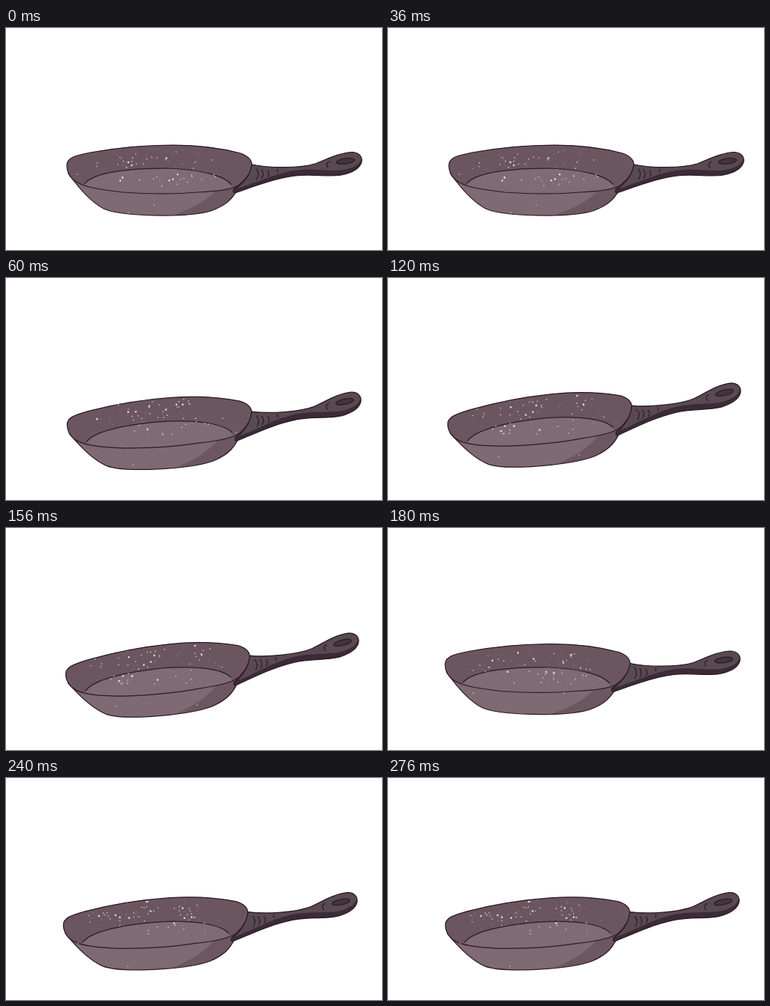
These frames come from a looping animation (500 by 296 pixels, 300 ms). An HTML page:

```html
<!DOCTYPE html>
<html lang="en">
<head>
<meta charset="utf-8">
<title>Frying pan</title>
<style>
  html, body { margin: 0; width: 100%; height: 100%; overflow: hidden; background: #fff; }
  svg { display: block; }
  .line { fill: none; stroke: #2c1b26; stroke-width: 1.25; stroke-linecap: round; stroke-linejoin: round; }
  .speck { fill: none; stroke: #eee3e7; stroke-linecap: round; }
</style>
</head>
<body>
<svg width="500" height="296" viewBox="0 0 500 296">
  <defs>
    <path id="body" d="M83 194C95 211 111 231 130 241C146 248 180 250 212 250C236 250 258 248 272 244C292 237 303 228 311 208Z"/>
    <path id="rim" d="M81 183C81 173 92 170 112 166C145 160 180 156 222 156C262 156 290 161 312 167C323 171 327 176 327 183C326 191 320 201 310 209C302 215 280 218 255 219C220 222 185 221 155 219C130 216 107 213 95 206C86 201 81 193 81 183Z"/>
    <path id="handle" d="M327 182C350 187 392 187 411 181C427 175 443 166 461 165.500C469 166 474 171 473 178C471 187 460 193 446 196C428 199 407 194 385 197C356 201 333 210 304 220Q301 219 303 215C315 207 325 196 327 182Z"/>
    <clipPath id="bodyClip"><use href="#body"/></clipPath>
  </defs>
  <g id="pan">
    <use href="#body" fill="#7f6972"/>
    <path clip-path="url(#bodyClip)" fill="#6c5660" d="M217 251C238 244 264 234 280 216L330 200V255Z"/>
    <use href="#body" class="line"/>
    <use href="#rim" fill="#6b5660"/>
    <path fill="#7f6b74" d="M104 209C118 192 165 187 212 187C255 188 293 196 301 213C285 217 270 218 255 219C220 222 185 221 155 219C130 216 112 213 104 209Z"/>
    <path class="line" d="M105 207C118 192 165 187 212 187C255 188 289 196 299 208"/>
    <use href="#rim" class="line"/>
    <use href="#handle" fill="#3a2b37"/>
    <path fill="#584953" d="M327 183C350 187 392 187 411 181C427 175 443 166 461 166C469 166 473 171 472 176C469 184 456 189 441 190C423 190 404 187 383 190C354 195 332 207 307 214C319 205 325 195 327 183Z"/>
    <use href="#handle" class="line"/>
    <ellipse class="line" style="fill:#43343f" cx="451.500" cy="177.500" rx="12" ry="3.600" transform="rotate(-8 451.500 177.500)"/>
    <path class="line" d="M333 188Q338 194 333 202M340 189Q344 195 340 200M348 190Q351 194 348 198M361 188V192M430 178Q424 181 428 186"/>
  </g>
  <path class="speck" stroke-width="1.100" stroke-opacity=".4"/>
  <path class="speck" stroke-width="1.700" stroke-opacity=".7"/>
  <path class="speck" stroke-width="2.500" stroke-opacity=".95"/>
</svg>
<script>
const STEP = 60;

// Pan pose, centres of dense speckles, and stray specks on the outside
const poses = [
  { move: "", dense: [[171, 176], [233, 199]], stray: [[163, 246], [197, 236], [95, 195]] },
  { move: "rotate(-4 270 185)", dense: [[173, 181], [238, 170]], stray: [[169, 249], [306, 206]] },
  { move: "translate(-1.500 0) rotate(-5.800 208 190)", dense: [[256, 164], [156, 202], [187, 173]], stray: [[147, 238], [254, 236]] },
  { move: "translate(-5 -1.500)", dense: [[219, 196], [236, 173]], stray: [[113, 220], [234, 220]] },
  { move: "translate(-5 .500) rotate(-4 270 185)", dense: [[139, 184], [235, 184], [191, 172]], stray: [[162, 251], [96, 220]] }
];

function randomFrom(seed) {
  return () => (seed = (seed * 16807) % 2147483647) / 2147483647;
}

const dot = (x, y) => `M${x.toFixed(1)} ${y.toFixed(1)}h.01`;

// Returns faint, medium and bright speckles as three path strings
function speckle({ dense, stray }, index) {
  const random = randomFrom(7919 * (index + 3));
  const layers = ["", "", ""];
  const scatter = (count, cx, cy, rx, ry, layer) => {
    for (let i = 0; i < count; i++) {
      const angle = random() * 2 * Math.PI;
      const reach = Math.sqrt(random());
      layers[layer] += dot(cx + rx * reach * Math.cos(angle), cy + ry * reach * Math.sin(angle));
    }
  };
  scatter(44, 202, 187, 95, 26, 0);
  scatter(24, 200, 186, 92, 25, 1);
  scatter(4, 200, 186, 86, 22, 2);
  for (const [x, y] of dense) {
    scatter(5, x, y, 19, 10, 1);
    scatter(2, x, y, 13, 8, 2);
  }
  for (const [x, y] of stray) layers[1] += dot(x, y);
  return layers;
}

const pan = document.getElementById("pan");
const specks = document.querySelectorAll(".speck");
const layersByPose = poses.map(speckle);
let shown = -1;

function draw() {
  const index = Math.floor(performance.now() / STEP) % poses.length;
  if (index !== shown) {
    shown = index;
    pan.setAttribute("transform", poses[index].move);
    specks.forEach((path, i) => path.setAttribute("d", layersByPose[index][i]));
  }
  requestAnimationFrame(draw);
}
draw();
</script>
</body>
</html>
```
